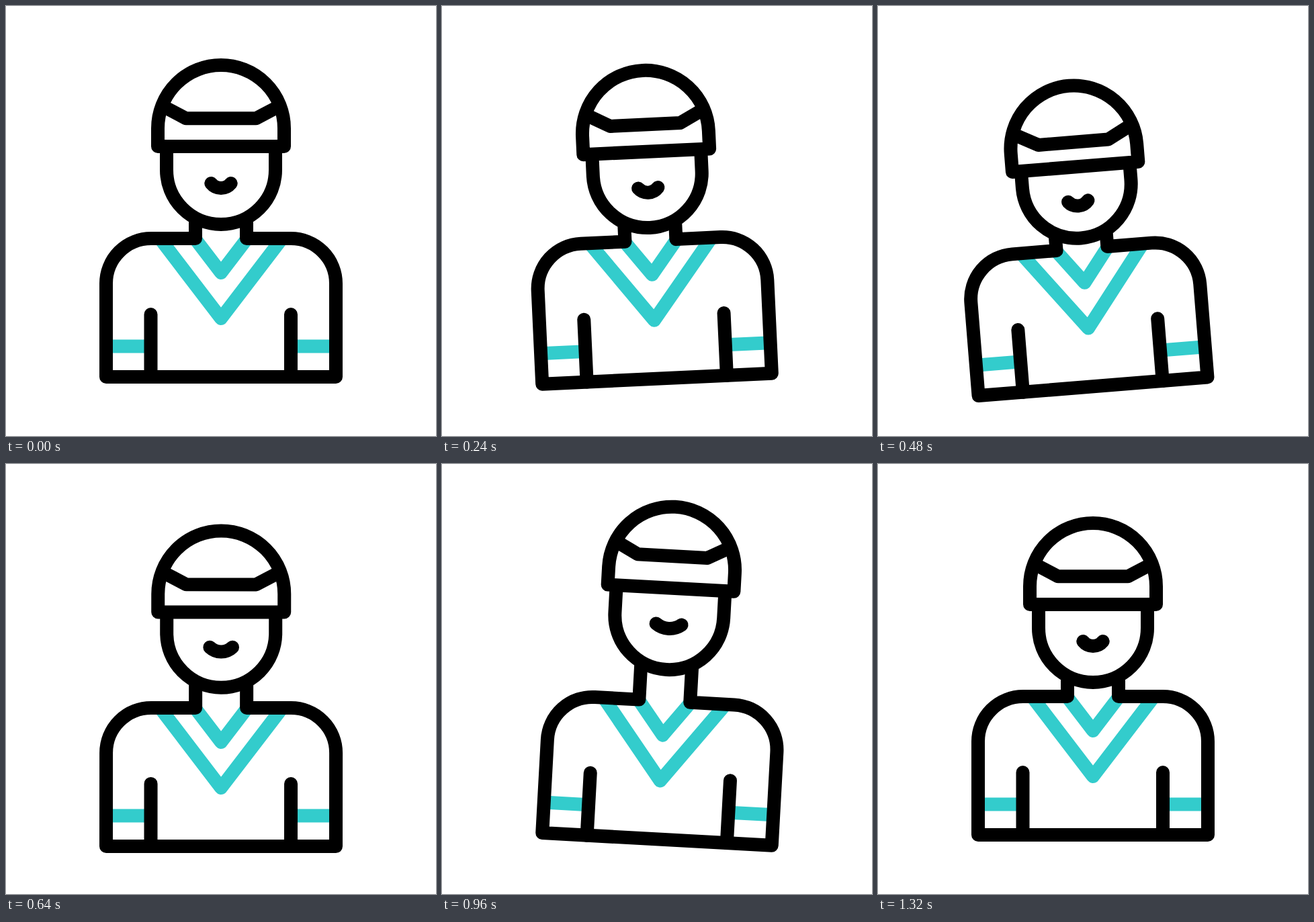
Animation of 640 by 640 pixels, one loop 1.4 s. Source, as an HTML page:

```html
<!DOCTYPE html>
<html lang="en">
<head>
<meta charset="utf-8">
<title>Swaying player</title>
<style>
  html, body { margin: 0; width: 100%; height: 100%; overflow: hidden; background: #fff; }
  svg { display: block; width: 100%; height: 100%; }
  .ink, .trim { fill: none; stroke: #000; stroke-width: 20; stroke-linejoin: round; }
  .trim { stroke: #3cc; }
  .round { stroke-linecap: round; }
  .solid { fill: #fff; }
</style>
</head>
<body>
<svg viewBox="0 0 640 640">
  <g id="body">
    <g class="trim">
      <path d="M229 346L320 465L411 346M281 346L320 397L359 346"/>
      <path d="M149 506.5H215M425 506.5H491"/>
    </g>
    <path class="ink" d="M282 285V346H216A67 67 0 0 0 149 413V552H491V413A67 67 0 0 0 424 346H358V285"/>
    <path class="ink round" d="M215.5 552V459M424 552V459"/>
    <g id="head">
      <path class="ink solid" d="M239 209V244A81 81 0 0 0 401 244V209"/>
      <path id="mouth" class="ink round"/>
      <g id="cap">
        <path class="ink solid" d="M226 209V182A94 94 0 0 1 414 182V209Z"/>
        <path id="brim" class="ink round" d="M236 150.5L268 167.3H372L404 150.5"/>
      </g>
    </g>
  </g>
</svg>
<script>
  const LOOP = 1400, STEP = 40;
  const part = id => document.getElementById(id);
  const body = part('body'), head = part('head'), mouth = part('mouth');
  const cap = part('cap'), brim = part('brim');

  const clamp = p => Math.min(1, Math.max(0, p));
  const ease = p => (1 - Math.cos(Math.PI * clamp(p))) / 2;
  const ramp = (t, from, span) => ease((t - from) / span);

  // Eases from rest to low, across to high, and back to rest.
  function sway(t, delay, low, high) {
    const out = ramp(t, delay, 340);
    const over = ramp(t, delay + 340, 425);
    const back = ramp(t, delay + 765, 415);
    return low * (out - over) + high * (over - back);
  }

  const shift = (el, y) => el.setAttribute('transform', `translate(0 ${y})`);

  function drawMouth(smile) {
    const w = 14.7 + 4.9 * smile, sag = 7 - 0.6 * smile;
    const r = (w * w + sag * sag) / (2 * sag);
    mouth.setAttribute('d', `M${320 - w} 264A${r} ${r} 0 0 0 ${320 + w} 264`);
  }

  function draw(t) {
    const drop = 17 * ease((530 - Math.abs(t - 640)) / 500);
    const tilt = sway(t, 68, -5.25, 4);
    body.setAttribute('transform', `translate(0 ${drop}) rotate(${tilt} 320 552)`);
    shift(head, sway(t, 105, 6, -29));
    shift(cap, sway(t, 120, 9.7, -6));
    shift(brim, sway(t, 120, 5, -6.5));
    shift(mouth, sway(t, 120, 6, -7.2));
    drawMouth(sway(t, 105, 0, 1));
  }

  const start = performance.now();

  function tick() {
    const t = (performance.now() - start + 4) % LOOP;
    draw(Math.floor(t / STEP) * STEP);
    requestAnimationFrame(tick);
  }
  tick();
</script>
</body>
</html>
```
